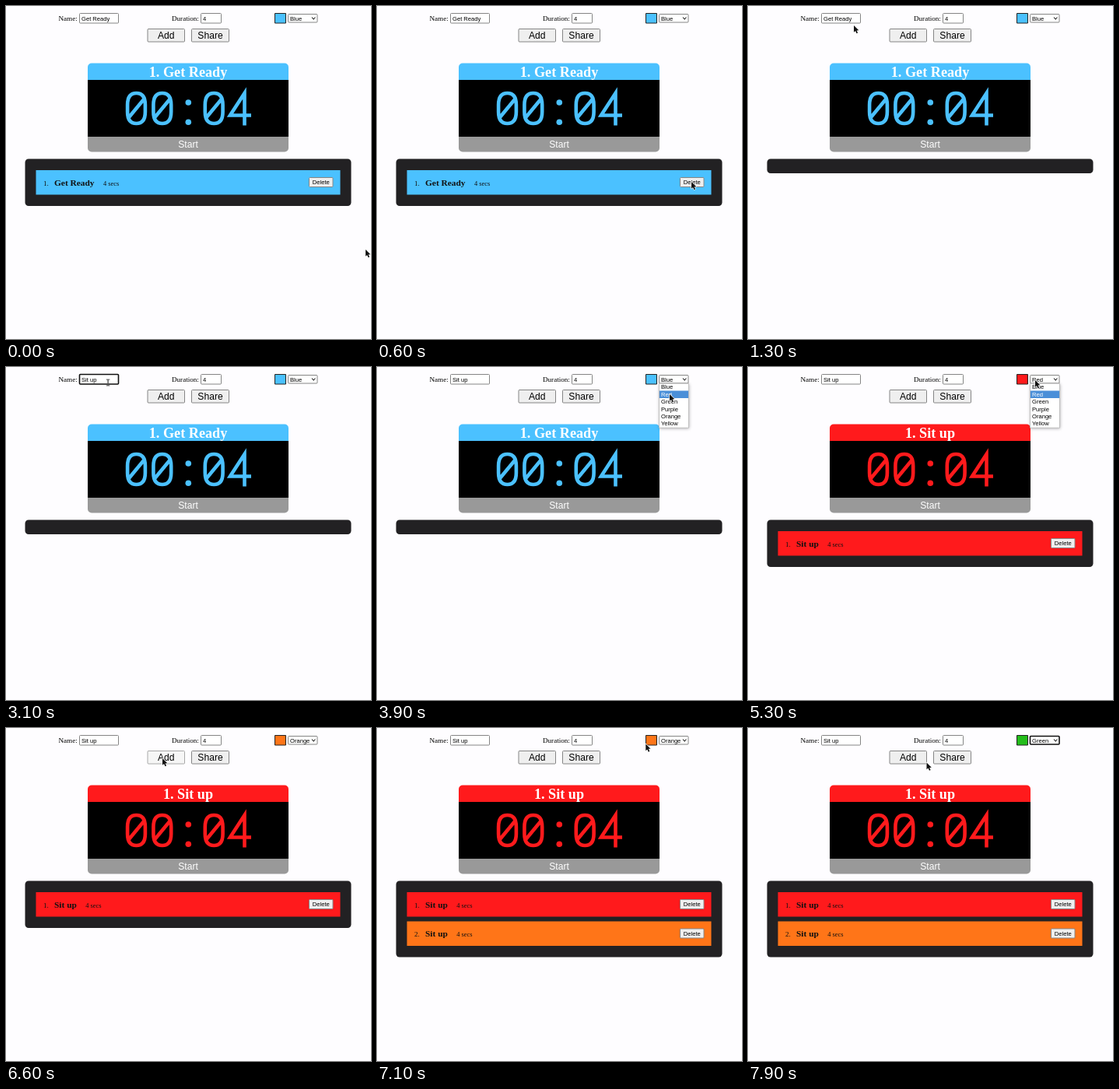
Animation of 469 by 428 pixels, one loop 8 s. Source, as an HTML page with a canvas:

```html
<!DOCTYPE html>
<html lang="en">
<head>
<meta charset="utf-8">
<title>Interval timer</title>
<style>
html, body { margin: 0; width: 100%; height: 100%; overflow: hidden; background: #fefdff; }
canvas { display: block; width: 469px; height: 428px; }
</style>
</head>
<body>
<canvas id="stage"></canvas>
<script>
const W = 469, H = 428, LOOP = 8000, STEP = 100;
const SERIF = '"Liberation Serif", serif';
const SANS = '"Liberation Sans", sans-serif';
const COLORS = {
  Blue: '#4bc1ff', Red: '#ff1a1c', Green: '#24bd1b',
  Purple: '#a020f0', Orange: '#ff7518', Yellow: '#ffe81a'
};
const OPTIONS = Object.keys(COLORS);

const canvas = document.getElementById('stage');
const ctx = canvas.getContext('2d');
const dpr = window.devicePixelRatio || 1;
canvas.width = W * dpr;
canvas.height = H * dpr;

// Pointer path: time, x, y
const PATH = [
  [0, 462, 313], [100, 459, 311], [300, 440, 283], [600, 404, 226], [1000, 403, 225],
  [1300, 136, 25], [1500, 131, 18], [1900, 131, 20], [3100, 131, 20],
  [3500, 379, 16], [3600, 379, 16], [3900, 376, 35], [4000, 376, 35],
  [4600, 213, 35.5], [4900, 213, 35.5], [5200, 369, 17], [5300, 369, 17],
  [5800, 377, 62], [6000, 377, 62], [6500, 201, 39], [6800, 201, 39],
  [7200, 372, 17], [7300, 372, 17], [7500, 376, 44], [7600, 376, 44], [7900, 229.5, 44.5]
];

// Value of the last [time, value] entry that has begun
const latest = (list, t) => list.reduce((v, [at, next]) => t >= at ? next : v, null);
const within = (t, ...spans) => spans.some(([a, b]) => t >= a && t < b);

function pointerAt(t) {
  const i = PATH.findIndex(p => p[0] > t);
  if (i < 0) return PATH[PATH.length - 1].slice(1);
  const [t0, x0, y0] = PATH[i - 1], [t1, x1, y1] = PATH[i];
  const u = (t - t0) / (t1 - t0), k = u * u * (3 - 2 * u);
  return [x0 + (x1 - x0) * k, y0 + (y1 - y0) * k];
}

function stateAt(t) {
  const [x, y] = pointerAt(t);
  const red = { name: 'Sit up', color: 'Red' };
  const orange = { name: 'Sit up', color: 'Orange' };
  const ready = { name: 'Get Ready', color: 'Blue' };
  return {
    x, y,
    items: latest([[0, [ready]], [800, []], [4800, [red]], [6700, [red, orange]]], t),
    current: t < 4800 ? ready : red,
    color: latest([[0, 'Blue'], [4000, 'Red'], [6000, 'Orange'], [7600, 'Green']], t),
    name: latest([[0, 'Get Ready'], [2000, 'S'], [2100, 'Si'], [2300, 'Sit'],
      [2500, 'Sit '], [2600, 'Sit u'], [2700, 'Sit up']], t),
    selected: within(t, [1700, 2000]),
    nameFocus: within(t, [1500, 3600]),
    open: within(t, [3600, 4000], [5200, 6000], [7300, 7600]),
    selectFocus: within(t, [4000, 4600], [6000, 6500], [7600, LOOP])
  };
}

function text(str, x, y, size, color = '#000', family = SANS, weight = '', align = 'left') {
  ctx.font = `${weight} ${size}px ${family}`;
  ctx.textAlign = align;
  ctx.fillStyle = color;
  ctx.fillText(str, x, y);
}

function box(x, y, w, h, fill, stroke, radius = 0, line = 1) {
  ctx.beginPath();
  ctx.roundRect(x, y, w, h, radius);
  if (fill) { ctx.fillStyle = fill; ctx.fill(); }
  if (stroke) { ctx.strokeStyle = stroke; ctx.lineWidth = line; ctx.stroke(); }
}

function button(label, x, y, w, h, size, hover) {
  box(x, y, w, h, hover ? '#f6f6f6' : '#efefef', hover ? '#a8a8a8' : '#858585', 1);
  text(label, x + w / 2, y + h / 2 + size * 0.35, size, '#000', SANS, '', 'center');
}

function input(x, w, value, focus, selected) {
  box(x, 9.5, w, 12.5, '#fff', focus ? '#101010' : '#858585', 1, focus ? 1.6 : 1);
  if (selected) {
    ctx.font = `7.6px ${SANS}`;
    ctx.fillStyle = '#4a90d9';
    ctx.fillRect(x + 2.5, 11.5, ctx.measureText(value).width, 9);
  }
  text(value, x + 2.5, 18.5, 7.6, selected ? '#fff' : '#000');
}

function form(s) {
  text('Name:', 67.5, 19, 9.1, '#000', SERIF);
  input(94.5, 50, s.name, s.nameFocus, s.selected);
  text('Duration:', 213, 19, 9.1, '#000', SERIF);
  input(250.5, 26, '4');
  box(345.5, 9.5, 14, 12.5, COLORS[s.color], '#222');
  box(362.5, 10.5, 37.5, 10.5, '#fff', s.selectFocus ? '#101010' : '#858585', 1, s.selectFocus ? 1.6 : 1);
  text(s.color, 365, 18.7, 7.6);
  ctx.beginPath();
  ctx.moveTo(393, 14.5);
  ctx.lineTo(395.2, 17);
  ctx.lineTo(397.4, 14.5);
  ctx.strokeStyle = '#222';
  ctx.lineWidth = 1.1;
  ctx.stroke();

  const over = (x, w) => s.x > x && s.x < x + w && s.y > 29 && s.y < 44;
  button('Add', 182, 29.5, 47.5, 16.5, 12.1, over(182, 47.5));
  button('Share', 238.5, 29.5, 48, 16.5, 12.1, over(238.5, 48));
}

function zero(cx) {
  const l = cx - 11.4, r = cx + 11.4, top = 112, bot = 151;
  ctx.moveTo(cx, top);
  ctx.bezierCurveTo(cx + 8, top, r, 118, r, 127);
  ctx.lineTo(r, 136);
  ctx.bezierCurveTo(r, 145, cx + 8, bot, cx, bot);
  ctx.bezierCurveTo(cx - 8, bot, l, 145, l, 136);
  ctx.lineTo(l, 127);
  ctx.bezierCurveTo(l, 118, cx - 8, top, cx, top);
  ctx.closePath();
  ctx.moveTo(cx - 9.5, 143);
  ctx.lineTo(cx + 9.5, 120);
}

function four(cx) {
  ctx.moveTo(cx + 6, 153.5);
  ctx.lineTo(cx + 6, 112);
  ctx.lineTo(cx - 12.5, 140.5);
  ctx.lineTo(cx + 14.5, 140.5);
}

function clock(color) {
  ctx.strokeStyle = ctx.fillStyle = color;
  ctx.lineWidth = 4.6;
  ctx.beginPath();
  [167.5, 200.8, 267.2].forEach(zero);
  four(300.5);
  ctx.stroke();
  for (const y of [124, 149.3]) {
    ctx.beginPath();
    ctx.arc(234.3, y, 3.8, 0, Math.PI * 2);
    ctx.fill();
  }
}

function timer(item) {
  const color = COLORS[item.color];
  ctx.save();
  ctx.beginPath();
  ctx.roundRect(105, 73.5, 258, 114, 5);
  ctx.clip();
  box(105, 73, 258, 22.5, color);
  box(105, 95, 258, 73, '#000');
  box(105, 168, 258, 20, '#999');
  ctx.restore();
  text('1. ' + item.name, 234, 90.5, 18.2, '#fff', SERIF, 'bold', 'center');
  clock(color);
  text('Start', 234, 181.5, 12.1, '#fff', SANS, '', 'center');
}

function list(items) {
  const pitch = 37.5, n = items.length;
  box(24.5, 196.5, 419, n ? 23 + n * pitch : 18.5, '#222123', null, 4.5);
  items.forEach((item, i) => {
    const y = 211 + i * pitch;
    box(38.5, y, 391, 31.5, COLORS[item.color]);
    text(i + 1 + '.', 48, y + 19.5, 9.1, '#111', SERIF);
    text(item.name, 62, y + 19.7, 11.4, '#111', SERIF, 'bold');
    ctx.font = `bold 11.4px ${SERIF}`;
    const end = 62 + ctx.measureText(item.name).width;
    text('4 secs', end + 11.5, y + 19.5, 8.4, '#111', SERIF);
    button('Delete', 389.5, y + 9.5, 30.5, 12, 7.6);
  });
}

function menu(s) {
  const pitch = 9.4, top = 21.2;
  ctx.save();
  ctx.shadowColor = 'rgba(0,0,0,.35)';
  ctx.shadowBlur = 4 * dpr;
  ctx.shadowOffsetY = dpr;
  box(362.5, top, 38, 57, '#fff');
  ctx.restore();
  box(362.5, top, 38, 57, null, '#b5b5b5', 0, 0.8);
  const hit = Math.floor((s.y - top) / pitch);
  const active = hit >= 0 ? hit : OPTIONS.indexOf(s.color);
  OPTIONS.forEach((name, i) => {
    const y = top + i * pitch;
    if (i === active) box(362.9, y, 37.2, pitch, '#4a8fd8');
    text(name, 365, y + 7.1, 7.6, i === active ? '#fff' : '#000');
  });
}

function arrow(x, y) {
  const shape = [[0, 0], [0, 8.8], [2, 7], [3.5, 10.2], [5.1, 9.5], [3.6, 6.4], [6.3, 6.2]];
  ctx.beginPath();
  shape.forEach(([dx, dy]) => ctx.lineTo(x + dx, y + dy));
  ctx.closePath();
  ctx.lineJoin = 'round';
  ctx.lineWidth = 1.2;
  ctx.strokeStyle = '#fff';
  ctx.stroke();
  ctx.fillStyle = '#111';
  ctx.fill();
  ctx.lineJoin = 'miter';
}

function beam(x, y) {
  ctx.fillStyle = '#555';
  ctx.fillRect(x - 0.6, y - 4, 1.4, 8);
  ctx.fillRect(x - 2.2, y - 4.4, 4.6, 1);
  ctx.fillRect(x - 2.2, y + 3.4, 4.6, 1);
}

function draw(t) {
  const s = stateAt(t);
  ctx.setTransform(dpr, 0, 0, dpr, 0, 0);
  ctx.fillStyle = '#fefdff';
  ctx.fillRect(0, 0, W, H);
  form(s);
  timer(s.current);
  list(s.items);
  if (s.open) menu(s);
  const inField = s.y > 9 && s.y < 22 && (s.x > 95 && s.x < 144 || s.x > 251 && s.x < 276);
  (inField ? beam : arrow)(s.x, s.y);
}

const start = performance.now();
function tick() {
  const t = (performance.now() - start) % LOOP;
  draw(Math.floor(t / STEP) * STEP);
  requestAnimationFrame(tick);
}
tick();
</script>
</body>
</html>
```
